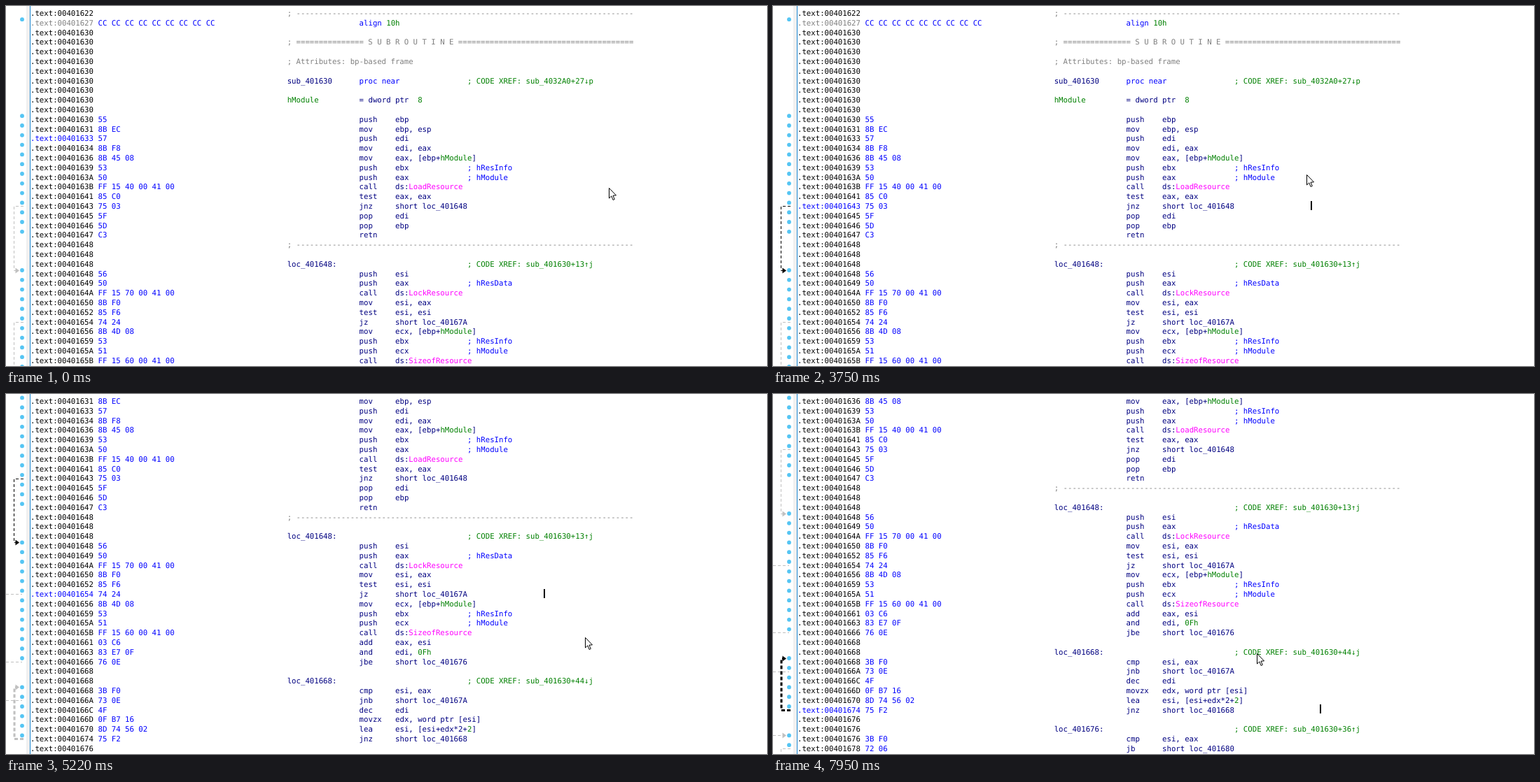
An HTML page with a canvas that plays this animation: 1087x515 px, repeating every 8 s.

```html
<!DOCTYPE html>
<html lang="en">
<head>
<meta charset="utf-8">
<title>Disassembly listing</title>
<style>
html, body { margin: 0; width: 100%; height: 100%; overflow: hidden; background: #fff; }
canvas { display: block; }
</style>
</head>
<body>
<canvas id="stage" width="1087" height="515"></canvas>
<script>
const ctx = document.getElementById('stage').getContext('2d');
const WIDTH = 1087, HEIGHT = 515, LOOP = 8000;
const CHAR = 6.433, LINE = 13.8, LEFT = 35, FIRST = 10.2;
const FONT = '10.685px "DejaVu Sans Mono", "Liberation Mono", monospace';
const NAVY = '#000080', BLUE = '#0000ff', GREEN = '#008000', GRAY = '#808080',
      PINK = '#ff00ff', PALE = '#c0c0c0', YELLOW = '#ffff00';
const LABEL = 57, CODE = 73, ARGS = 81, NOTE = 97;
const RULE = '; ' + '-'.repeat(75);
const TITLE = '; ' + '='.repeat(15) + ' S U B R O U T I N E ' + '='.repeat(39);

// address | bytes | mnemonic | operands | comment | label
const rows = `1622|||||${RULE}
1627|CC CC CC CC CC CC CC CC CC|align 10h
1630
1630|||||${TITLE}
1630
1630|||||; Attributes: bp-based frame
1630
1630||proc near||; CODE XREF: sub_4032A0+27↓p|sub_401630
1630
1630||= dword ptr  8|||hModule
1630
1630|55|push|ebp
1631|8B EC|mov|ebp, esp
1633|57|push|edi
1634|8B F8|mov|edi, eax
1636|8B 45 08|mov|eax, [ebp+hModule]
1639|53|push|ebx|; hResInfo
163A|50|push|eax|; hModule
163B|FF 15 40 00 41 00|call|ds:LoadResource
1641|85 C0|test|eax, eax
1643|75 03|jnz|short loc_401648
1645|5F|pop|edi
1646|5D|pop|ebp
1647|C3|retn
1648|||||${RULE}
1648
1648||||; CODE XREF: sub_401630+13↑j|loc_401648:
1648|56|push|esi
1649|50|push|eax|; hResData
164A|FF 15 70 00 41 00|call|ds:LockResource
1650|8B F0|mov|esi, eax
1652|85 F6|test|esi, esi
1654|74 24|jz|short loc_40167A
1656|8B 4D 08|mov|ecx, [ebp+hModule]
1659|53|push|ebx|; hResInfo
165A|51|push|ecx|; hModule
165B|FF 15 60 00 41 00|call|ds:SizeofResource
1661|03 C6|add|eax, esi
1663|83 E7 0F|and|edi, 0Fh
1666|76 0E|jbe|short loc_401676
1668
1668||||; CODE XREF: sub_401630+44↓j|loc_401668:
1668|3B F0|cmp|esi, eax
166A|73 0E|jnb|short loc_40167A
166C|4F|dec|edi
166D|0F B7 16|movzx|edx, word ptr [esi]
1670|8D 74 56 02|lea|esi, [esi+edx*2+2]
1674|75 F2|jnz|short loc_401668
1676
1676||||; CODE XREF: sub_401630+36↑j|loc_401676:
1676|3B F0|cmp|esi, eax
1678|72 06|jb|short loc_401680`.split('\n').map(line => {
  const [addr, bytes = '', op = '', args = '', note = '', label = ''] = line.split('|');
  return { addr, bytes, op, args, note, label };
});

// [time, value]: the last entry whose time has passed holds
const scrolls = [[0, 0], [4050, 3], [4210, 6], [4370, 9], [4980, 12], [5280, 15]];
const carets = [[0, 0], [360, 1], [860, 0], [1400, 1], [1940, 0], [2090, 1], [2340, 0],
  [2570, 1], [3130, 0], [3670, 1], [4910, 0], [4980, 1], [5820, 0], [6150, 1],
  [6310, 0], [6390, 1], [6940, 0], [7480, 1]];
const places = [[0, { col: 138, row: 13 }], [2090, { col: 114, row: 26 }],
  [2340, { col: 114, row: 20 }], [6150, { col: 116, row: 26 }], [6310, { col: 116, row: 32 }]];
const marks = [[0, ''], [2090, 'sub_401630'], [2340, ''], [6150, 'sub_401630'], [6310, '']];
const upper = { x: 785, y: 390, from: 12, mark: 'loc_401648' };
const lower = { x: 799, y: 390, from: 39, mark: 'loc_401668' };
const hints = [[0, null], [1940, upper], [2090, null], [2570, upper], [3590, null],
  [4590, { ...upper, x: 793, y: 270 }], [4820, null],
  [5920, lower], [6150, null], [6390, lower], [7880, null]];

// time, x, y of the pointer tip
const path = [[0, 861, 260], [300, 861, 260], [700, 790, 284], [1160, 688, 286],
  [1320, 662, 312], [1520, 690, 346], [1790, 767, 368], [3520, 767, 368],
  [3700, 761, 270], [3910, 766, 151], [4050, 768, 160], [4370, 775, 246],
  [4510, 775, 248], [4820, 777, 250], [5220, 827, 348], [5360, 826, 362],
  [5860, 781, 367], [7810, 781, 367], [7880, 737, 357], [7950, 691, 371], [8000, 691, 371]];

function hold(track, t) {
  let value;
  for (const [time, v] of track) if (t >= time) value = v;
  return value;
}

function pointerAt(t) {
  const i = path.findIndex(p => p[0] > t);
  const [t0, x0, y0] = path[i - 1], [t1, x1, y1] = path[i];
  const k = (t - t0) / (t1 - t0);
  return [Math.round(x0 + (x1 - x0) * k), Math.round(y0 + (y1 - y0) * k)];
}

const centre = line => FIRST + line * LINE;

function put(text, x, y, color, mark) {
  const at = mark ? text.indexOf(mark) : -1;
  if (at >= 0) {
    ctx.fillStyle = YELLOW;
    ctx.fillRect(x + at * CHAR, y - 7.2, mark.length * CHAR, LINE);
  }
  ctx.fillStyle = color;
  ctx.fillText(text, x, y + 3.7);
}

const special = /(hModule|\w+Resource|\b(?:0Fh|10h|8)\b|2(?=\]))/;

function putCode(text, x, y, color, mark) {
  for (const part of text.split(special)) {
    if (!part) continue;
    const tint = !special.test(part) && part !== '2' ? color : /Resource/.test(part) ? PINK : GREEN;
    put(part, x, y, tint, mark);
    x += part.length * CHAR;
  }
}

function drawCode(row, left, y, mark) {
  const x = col => left + (col - LABEL) * CHAR;
  const tint = row.label[0] === ';' ? GRAY : row.label === 'hModule' ? GREEN : NAVY;
  put(row.label, x(LABEL), y, tint, mark);
  putCode(row.op, x(CODE), y, /^(align|proc)/.test(row.op) ? BLUE : NAVY, mark);
  putCode(row.args, x(ARGS), y, NAVY, mark);
  put(row.note, x(NOTE), y, /XREF/.test(row.note) ? GREEN : BLUE, mark);
}

function stroke(points, color, width) {
  ctx.strokeStyle = color;
  ctx.lineWidth = width;
  ctx.setLineDash(width > 1 ? [5, 3] : [4, 3]);
  ctx.beginPath();
  points.forEach(([x, y]) => ctx.lineTo(x, y));
  ctx.stroke();
  ctx.setLineDash([]);
}

function head(y, color) {
  ctx.fillStyle = color;
  ctx.beginPath();
  ctx.moveTo(13.5, y - 4);
  ctx.lineTo(19, y);
  ctx.lineTo(13.5, y + 4);
  ctx.fill();
}

function drawArrows(top, t) {
  const tail = row => Math.round(centre(row - top)) + 0.5;
  const tip = row => Math.round(centre(row - top) - 4.8) + 0.5;
  const link = (from, to, color, width) => {
    const x = width > 1 ? 12 : 11.5;
    stroke([[25, tail(from)], [x, tail(from)], [x, tip(to)], [15, tip(to)]], color, width);
    head(tip(to), color);
  };
  const away = row => stroke([[0, tail(row)], [23, tail(row)]], PALE, 1);

  link(20, 27, t >= 2090 && t < 6150 ? '#000' : PALE, 1);
  if (top) away(32);
  else stroke([[25, tail(32)], [11.5, tail(32)], [11.5, HEIGHT]], PALE, 1);
  away(39);
  away(43);
  link(47, 42, t >= 6150 ? '#000' : PALE, 3);
  stroke([[0, tip(50)], [15, tip(50)]], PALE, 1);
  head(tip(50), PALE);
  stroke([[25, tail(51)], [11.5, tail(51)], [11.5, HEIGHT + 20]], PALE, 1);
}

function drawListing(top, current, mark) {
  ctx.fillStyle = '#f0f0f0';
  ctx.fillRect(29, 0, 5, HEIGHT);
  ctx.fillStyle = '#1a86d0';
  ctx.fillRect(34, 0, 1, HEIGHT);
  for (let line = 0; line < 38 && rows[top + line]; line++) {
    const row = rows[top + line], y = centre(line);
    const color = top + line === current ? BLUE : row.op.startsWith('align') ? GRAY : '#000';
    put('.text:0040' + row.addr, LEFT, y, color);
    put(row.bytes, LEFT + 15 * CHAR, y, BLUE);
    drawCode(row, LEFT + LABEL * CHAR, y, mark);
  }
}

function drawDots(top) {
  ctx.fillStyle = '#55c5f3';
  for (let line = 0; line < 38 && rows[top + line]; line++) {
    if (!rows[top + line].bytes) continue;
    ctx.beginPath();
    ctx.arc(23, centre(line) - 4.8, 2.9, 0, Math.PI * 2);
    ctx.fill();
  }
}

function drawHint({ x, y, from, mark }) {
  const height = 10 * LINE + 4;
  ctx.fillStyle = '#ffffe1';
  ctx.fillRect(x, y, WIDTH - x + 5, height);
  ctx.strokeStyle = '#767676';
  ctx.lineWidth = 1;
  ctx.strokeRect(x - 0.5, y - 0.5, WIDTH - x + 5, height);
  rows.slice(from, from + 10).forEach((row, i) => drawCode(row, x + 0.8, y + 8 + i * LINE, mark));
}

function drawPointer(x, y) {
  ctx.beginPath();
  [[0, 0], [0, 14.5], [3.3, 11.4], [5.6, 17], [7.8, 16], [5.5, 10.7], [10, 10.4]]
    .forEach(([dx, dy]) => ctx.lineTo(x + dx, y + dy));
  ctx.closePath();
  ctx.fillStyle = '#fff';
  ctx.fill();
  ctx.strokeStyle = '#000';
  ctx.lineWidth = 1;
  ctx.stroke();
}

function draw(t) {
  const top = hold(scrolls, t), place = hold(places, t), hint = hold(hints, t);
  ctx.fillStyle = '#fff';
  ctx.fillRect(0, 0, WIDTH, HEIGHT);
  ctx.font = FONT;
  drawListing(top, top + place.row, hold(marks, t));
  drawArrows(top, t);
  drawDots(top);
  if (hold(carets, t)) {
    ctx.fillStyle = '#000';
    ctx.fillRect(Math.floor(LEFT + place.col * CHAR), Math.floor(centre(place.row) - 7.2), 2, 13);
  }
  if (hint) drawHint(hint);
  const [x, y] = pointerAt(t);
  drawPointer(x + 0.5, y + 0.5);
}

ctx.textRendering = 'geometricPrecision';
const start = performance.now();
function tick() {
  draw((performance.now() - start) % LOOP);
  requestAnimationFrame(tick);
}
tick();
</script>
</body>
</html>
```
